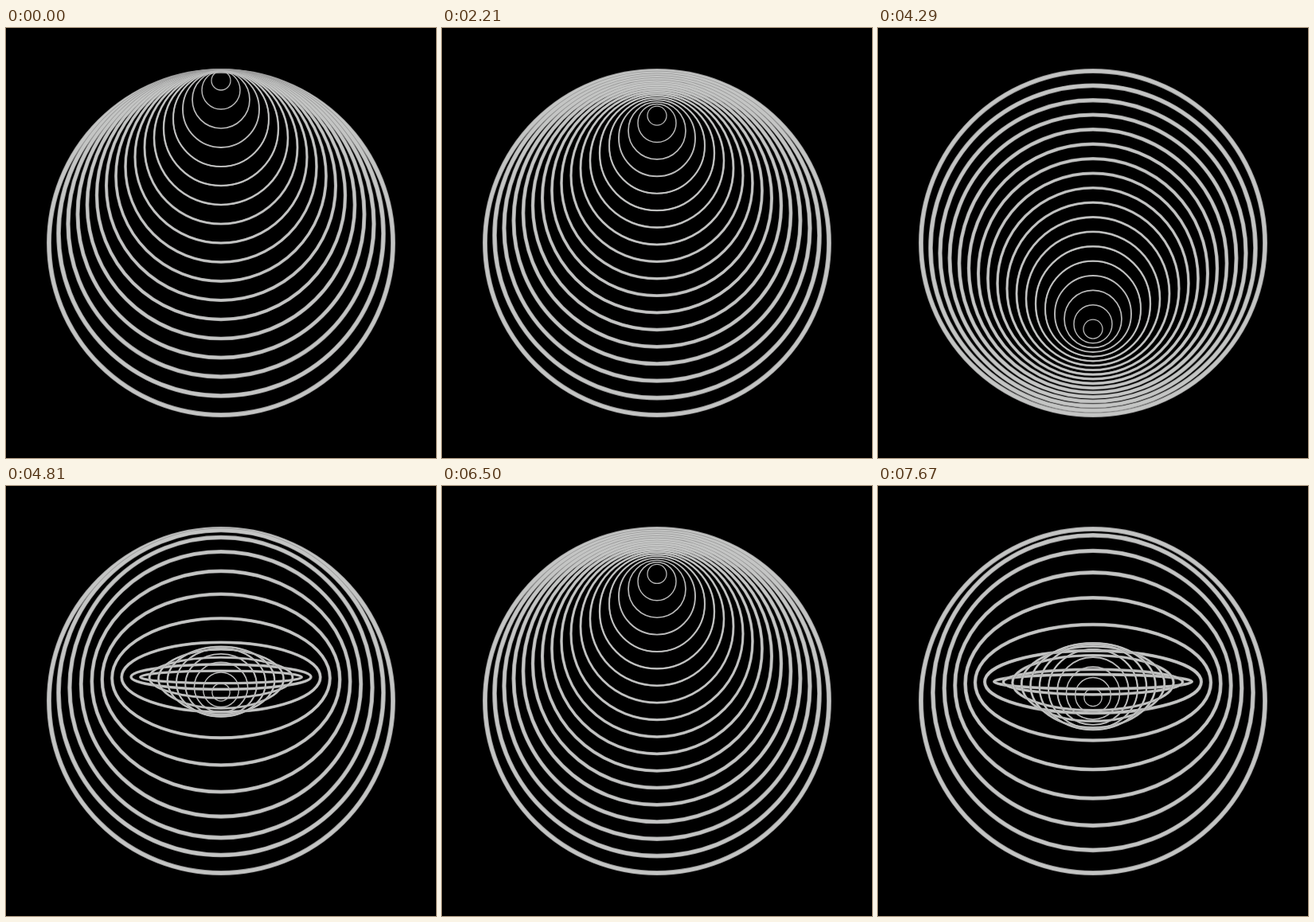
Recreate the animation shown at these times as an HTML page with a canvas. Size 540 by 540 pixels, loop 7800 ms.

```html
<!DOCTYPE html>
<html lang="en">
<head>
<meta charset="utf-8">
<title>Rings</title>
<style>
  html, body { margin: 0; width: 100%; height: 100%; overflow: hidden; background: #000; }
  canvas { display: block; width: 540px; height: 540px; }
</style>
</head>
<body>
<canvas id="stage" width="540" height="540"></canvas>
<script>
const ctx = document.getElementById('stage').getContext('2d');
const STEP = 130, STEPS = 60;
const RINGS = 18, GAP = 12, MID = 270;
const CYCLE = 22.18;                        // steps per drop-and-flip
const FLIP_START = 12.2, FLIP_MID = 14.64, FLIP_END = 17;

const clamp = (v, lo = 0, hi = 1) => Math.min(hi, Math.max(lo, v));
const mix = (a, b, k) => a + (b - a) * k;

// Shift of the flat rings: -1 touches the top, +1 the bottom.
function slide(p) {
  if (p < 2.5) return -1;
  if (p < FLIP_START) return Math.min(1, -1 + 0.0221 * (p - 2.5) ** 2);
  return -1 + 0.00656 * (p - 22.74) ** 2;
}

// Tilt of ring i: the flip runs from the outer ring to the inner ones.
function tilt(i, p) {
  const lag = (p - FLIP_MID) / (FLIP_END - FLIP_MID);
  const x = clamp(i / (RINGS - 1) - lag);
  return Math.PI * (1 - (1 - x ** 1.12) ** 1.4);
}

// Distance between neighbouring centres while flipping.
function spread(i, p) {
  const loose = 2.7 + 7.9 * Math.exp(-(i - 1) / 1.2);
  return p < FLIP_MID
    ? mix(GAP, loose, (p - FLIP_START) / (FLIP_MID - FLIP_START))
    : mix(loose, -GAP * slide(FLIP_END), (p - FLIP_MID) / (FLIP_END - FLIP_MID));
}

function ring(y, rx, ry, width) {
  const line = (color, w) => {
    ctx.strokeStyle = color;
    ctx.lineWidth = w;
    ctx.beginPath();
    ctx.ellipse(MID, y, rx, ry, 0, 0, 2 * Math.PI);
    ctx.stroke();
  };
  line(width > 2 ? '#999' : '#bababa', width);
  if (width > 2) line('#c4c5c4', width * 0.7);
}

function draw(n) {
  const p = n % CYCLE;
  const flipping = p > FLIP_START && p < FLIP_END;
  ctx.fillStyle = '#000';
  ctx.fillRect(0, 0, 540, 540);
  let y = MID;
  for (let i = 0; i < RINGS; i++) {
    const r = GAP * (RINGS - i);
    const width = 1.1 + 4.9 * (r / 216) ** 1.2;
    const a = flipping ? tilt(i, p) : 0;
    const far = 1 - 0.07 * (1 - Math.exp(-a / 0.8));   // tilted rings recede
    if (i) y += flipping ? -spread(i, p) * Math.cos(a) : GAP * slide(p);
    ring(y, r * far, r * far * Math.abs(Math.cos(a)), width);
  }
}

const start = performance.now();
function tick() {
  draw(Math.floor(Math.max(0, performance.now() - start) / STEP) % STEPS);
  requestAnimationFrame(tick);
}
tick();
</script>
</body>
</html>
```
